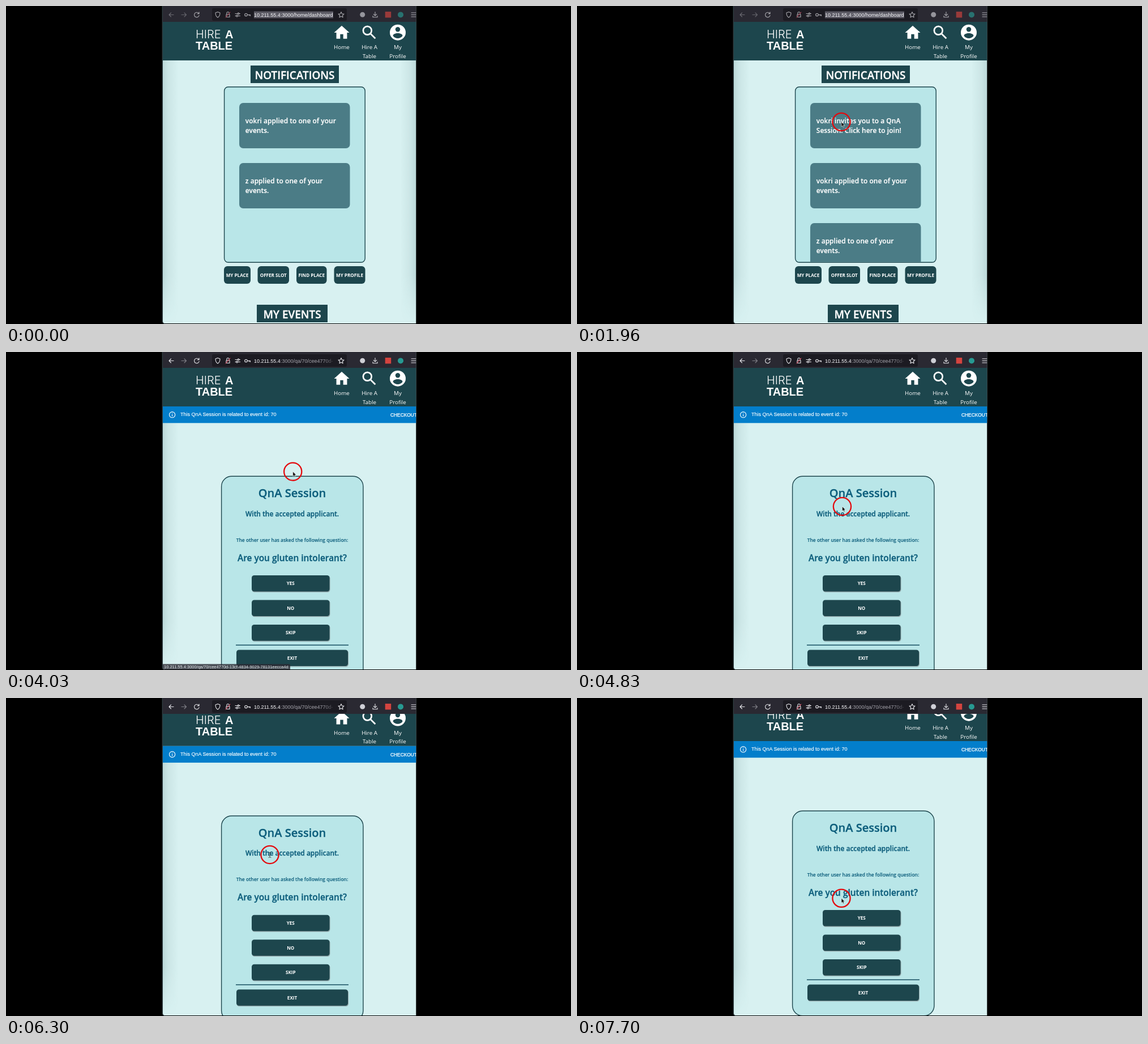
Write an HTML page that moves like this. It is 998x561 px and loops after 8000 ms.

```html
<!DOCTYPE html>
<html lang="en">
<head>
<meta charset="utf-8">
<title>Event dashboard</title>
<style>
  html, body { margin: 0; width: 100%; height: 100%; overflow: hidden; background: #000; }
  svg { display: block; width: 100vw; height: 100vh; }
  text { font-family: "Open Sans", "Noto Sans", sans-serif; white-space: pre; }
  .ui, .ui text { font-family: "Liberation Sans", Arial, sans-serif; }
  .mid { text-anchor: middle; }
  .head { font-size: 18.9px; font-weight: 600; fill: #fff; stroke: #fff; stroke-width: .35; stroke-linejoin: round; }
  .note { font-size: 11.9px; font-weight: 600; letter-spacing: .06px; fill: #fff; stroke: #fff; stroke-width: .2; stroke-linejoin: round; }
  .btn { font-size: 8.1px; font-weight: 700; fill: #fff; }
  .nav { font-size: 9.8px; fill: #fff; }
  .ask { font-weight: 600; fill: #0d5e7c; stroke: #0d5e7c; stroke-width: .3; stroke-linejoin: round; }
  .dark { fill: #1d464d; }
  .line { fill: none; stroke-width: 1.1; stroke-linecap: round; stroke-linejoin: round; }
</style>
</head>
<body>
<svg viewBox="0 0 998 561" preserveAspectRatio="none">
  <defs>
    <clipPath id="window"><path d="M277 0H724.3V560H281a4 4 0 0 1-4-4Z"/></clipPath>
    <clipPath id="page"><rect x="277" y="28" width="448" height="532"/></clipPath>
    <clipPath id="panel"><rect x="386" y="143" width="248" height="308.5" rx="6"/></clipPath>
    <clipPath id="address"><rect x="436" y="4" width="142" height="22"/></clipPath>
    <linearGradient id="edge">
      <stop offset="0" stop-color="#24575c" stop-opacity=".15"/>
      <stop offset=".45" stop-color="#24575c" stop-opacity=".06"/>
      <stop offset="1" stop-color="#24575c" stop-opacity="0"/>
    </linearGradient>
    <linearGradient id="fall" x2="0" y2="1">
      <stop offset=".84" stop-color="#fff"/>
      <stop offset="1" stop-color="#000"/>
    </linearGradient>
    <mask id="soft" maskUnits="userSpaceOnUse" x="277" y="28" width="448" height="532">
      <rect x="277" y="28" width="448" height="532" fill="url(#fall)"/>
    </mask>
    <linearGradient id="fade" gradientUnits="userSpaceOnUse" x1="560" x2="579" y1="0" y2="0">
      <stop offset="0" stop-color="#a3a2aa"/>
      <stop offset="1" stop-color="#a3a2aa" stop-opacity=".15"/>
    </linearGradient>
  </defs>

  <rect width="998" height="561"/>
  <path d="M276.300 0V556a4 4 0 0 0 4 4" fill="none" stroke="#2f3d41" stroke-width="1.400"/>

  <g clip-path="url(#window)">
    <rect x="277" width="448" height="561" fill="#d8f1f1"/>
    <g clip-path="url(#page)">
      <g mask="url(#soft)"><rect x="277" y="28" width="27" height="532" fill="url(#edge)"/></g>

      <g id="scroller">
        <rect class="dark" x="277" y="28" width="448" height="68"/>
        <g fill="#fff">
          <text x="335" y="57" font-size="20" style="font-family:Inter,sans-serif;font-weight:300">HIRE</text>
          <g class="ui" font-size="20" font-weight="700">
            <text x="387" y="57">A</text>
            <text x="335" y="77">TABLE</text>
          </g>
          <path transform="translate(576.8 30.8) scale(1.35)" d="M10 20v-6h4v6h5v-8h3L12 3 2 12h3v8z"/>
          <g fill="none" stroke="#fff" stroke-width="2.7">
            <circle cx="638.3" cy="43.2" r="7.4"/>
            <path d="M643.5 48.5L652.3 57.2"/>
          </g>
          <circle cx="692" cy="46.7" r="14"/>
        </g>
        <circle class="dark" cx="692" cy="41.3" r="4.2"/>
        <path class="dark" d="M683.5 52.4c.2-6 16.8-6 17 0a10.2 10.2 0 0 1-17 0Z"/>
        <g class="nav mid">
          <text x="593" y="76.3">Home</text>
          <text x="642" y="76.3">Hire A</text><text x="642" y="91.5">Table</text>
          <text x="692" y="76.3">My</text><text x="692" y="91.5">Profile</text>
        </g>

        <g id="dashboard">
          <g mask="url(#soft)"><rect x="-724" y="96" width="27" height="464" transform="scale(-1 1)" fill="url(#edge)"/></g>
          <rect class="dark" x="432" y="105" width="156" height="31"/>
          <text class="head mid" x="510" y="128.7">NOTIFICATIONS</text>
          <rect x="385.6" y="142.7" width="248.6" height="309.5" rx="7" fill="#b9e6e8" stroke="#1d464d" stroke-width="1.4"/>
          <g clip-path="url(#panel)"><g id="cards"></g></g>
          <g id="shortcuts"></g>
          <rect class="dark" x="443" y="527" width="125" height="31"/>
          <text class="head mid" x="505.5" y="550.5">MY EVENTS</text>
        </g>

        <g id="session">
          <rect x="277" y="96" width="448" height="29.3" fill="#037ecb"/>
          <g class="ui" fill="#fff" stroke="#fff">
            <circle class="line" cx="293.6" cy="110.7" r="5.1"/>
            <path class="line" d="M293.6 110.3v2.8M293.6 108.1v.1"/>
            <text x="308" y="113.2" font-size="9" stroke-width=".15">This QnA Session is related to event id: 70</text>
            <text x="679" y="113.9" font-size="8.4" stroke-width=".25">CHECKOUT</text>
          </g>
          <rect x="380.6" y="219.2" width="250.3" height="361.5" rx="18" fill="#b9e6e8" stroke="#1d464d" stroke-width="1.4"/>
          <g class="ask mid">
            <text x="505.5" y="255.8" font-size="20">QnA Session</text>
            <text x="505.5" y="289.6" font-size="12">With the accepted applicant.</text>
            <text x="505.5" y="334.7" font-size="8.45" stroke-width=".1">The other user has asked the following question:</text>
            <text x="505.5" y="368.6" font-size="15.4">Are you gluten intolerant?</text>
          </g>
          <g id="answers"></g>
          <rect x="406" y="516.2" width="199" height="1.7" fill="#2a6070"/>
        </g>
      </g>

      <g id="status" class="ui">
        <path d="M277 550.500H500a2 2 0 0 1 2 2V561H277Z" fill="#2b2a33"/>
        <text x="279" y="558.400" font-size="7.480" fill="#f0f0f4">10.211.55.4:3000/qa/70/cee4770d-13cf-4834-9029-78131eecca4d</text>
      </g>
    </g>

    <rect x="277" width="448" height="28" fill="#2a2932"/>
    <rect x="364" y="4" width="238" height="22" rx="3" fill="#1c1b22"/>
    <g id="icons" stroke="#e6e6ea" class="line">
      <path id="back" d="M296 15.5h-8m3.5-3.5l-3.5 3.5 3.5 3.5"/>
      <path opacity=".45" d="M310 15.5h8.5m-3.5-3.5l3.5 3.5-3.5 3.5"/>
      <path d="M340.5 13.2a4.3 4.3 0 1 0 .6 3.3M341 10.8v2.9h-2.9"/>
      <path d="M374 10.5l4 1.4c0 4-1 6.6-4 8.4-3-1.8-4-4.4-4-8.4Z"/>
      <path d="M389 15h6v4.5h-6ZM390 15v-2.5a2 2 0 0 1 4 0V15"/>
      <path stroke="#e2445c" d="M388 20l8-9"/>
      <path d="M405 13.5h4m3 0h1.5M405 17.5h1.5m3 0h4"/>
      <circle cx="410.5" cy="13.5" r="1.4"/><circle cx="408" cy="17.5" r="1.4"/>
      <circle cx="424" cy="15.5" r="2.3"/><path d="M426.5 15.5h5v2m-2-2v1.5"/>
      <path d="M592 10.5l1.5 3.2 3.5.4-2.6 2.4.7 3.5-3.1-1.8-3.1 1.8.7-3.5-2.6-2.4 3.5-.4Z"/>
      <path d="M652 10.5v6.5m-2.8-2.6l2.8 2.8 2.8-2.8M648 17.5v2.3h8v-2.3"/>
      <path d="M716 12h9m-9 3.5h9m-9 3.5h9"/>
    </g>
    <g id="badges">
      <circle cx="629.7" cy="15.3" r="4.5" fill="#cfcfd6"/>
      <rect x="669.7" y="10" width="10.5" height="10.5" fill="#d5443f"/>
      <circle cx="697" cy="15.4" r="5" fill="#279a92"/>
    </g>
    <g class="ui" font-size="9" clip-path="url(#address)">
      <g id="homeUrl">
        <rect x="438" y="9.5" width="140" height="12" fill="#5c5b65"/>
        <text x="438" y="18.6" fill="#fbfbfe">10.211.55.4:3000/home/dashboard</text>
      </g>
      <text id="sessionUrl" x="438" y="18.6" fill="url(#fade)"><tspan fill="#fbfbfe">10.211.55.4</tspan>:3000/qa/70/cee4770d-13cf</text>
    </g>

    <g id="cursor">
      <circle r="15.6" fill="none" stroke="#e4090d" stroke-width="2.3"/>
      <path id="arrow" d="M0 0V8.3L1.9 6.6 3.2 9.5 4.7 8.8 3.4 6H6Z" fill="#111" stroke="#fff" stroke-width=".6"/>
      <path id="beam" class="line" d="M-2-4.5Q0-4.5 0-3Q0-4.5 2-4.5M0-3V3.5M-2 5Q0 5 0 3.5Q0 5 2 5M-1.2 1h2.4" stroke="#333" style="stroke-width:.8"/>
    </g>
  </g>
</svg>

<script>
const LOOP = 8000, INVITED = 830, OPENED = 2360, CARD_STEP = 106;
const el = id => document.getElementById(id);
const show = (id, on) => el(id).setAttribute("display", on ? "inline" : "none");
const move = (id, x, y) => el(id).setAttribute("transform", `translate(${x} ${y})`);
const dim = (id, opacity) => el(id).setAttribute("opacity", opacity);

const card = ([first, second], i) => `<g transform="translate(412 ${171 + i * CARD_STEP})">
  <rect width="195.5" height="80" rx="7" fill="#4b7c86"/>
  <text class="note" x="10.8" y="35.8">${first}</text>
  <text class="note" x="10.8" y="53.4">${second}</text></g>`;

const shortcut = ([label, x, width]) => `<rect class="dark" x="${x}" y="459" width="${width}" height="31" rx="6"/>
  <text class="btn mid" x="${x + width / 2}" y="477.5">${label}</text>`;

const answer = ([label, x, y, width]) => `<rect x="${x + .5}" y="${y + .8}" width="${width + .5}" height="29" rx="4.5" fill="#8fa3a6"/>
  <rect class="dark" x="${x}" y="${y}" width="${width}" height="28.5" rx="4.5"/>
  <text class="btn mid" x="${x + width / 2}" y="${y + 17.3}">${label}</text>`;

const fill = (id, items, draw) => { el(id).innerHTML = items.map(draw).join(""); };

fill("cards", [
  ["vokri invites you to a QnA", "Session. Click here to join!"],
  ["vokri applied to one of your", "events."],
  ["z applied to one of your", "events."]
], card);
fill("shortcuts", [
  ["MY PLACE", 385, 47], ["OFFER SLOT", 444.5, 55.5], ["FIND PLACE", 513, 53.5], ["MY PROFILE", 579.5, 55]
], shortcut);
fill("answers", [
  ["YES", 434, 394, 137.5], ["NO", 434, 437.5, 137.5], ["SKIP", 434, 481, 137.5], ["EXIT", 407, 525.5, 197]
], answer);

// Keys are [time, ...values].
const pointerKeys = [
  [1000, 742, 330], [1630, 494, 210], [1900, 494, 210], [1960, 467, 204.5], [2100, 387, 185],
  [2300, 387, 185], [2360, 506.7, 211], [4440, 506.7, 211], [4900, 466, 276.5],
  [7500, 466, 276.5], [7700, 467, 353.3]
];
const scrollKeys = [
  [5300, 0], [5430, 7.4], [5630, 10.4], [6240, 10.4], [6300, 11.2],
  [6830, 22.2], [7340, 22.2], [7360, 20]
];
const statusKeys = [[3960, 1], [4360, 0]];
const linear = p => p;
const smooth = p => p * p * (3 - 2 * p);

function sample(keys, t, ease) {
  const next = keys.findIndex(key => key[0] > t);
  if (next < 0) return keys[keys.length - 1].slice(1);
  if (next === 0) return keys[0].slice(1);
  const [t0, ...from] = keys[next - 1], [t1, ...to] = keys[next];
  const p = ease((t - t0) / (t1 - t0));
  return from.map((v, i) => v + (to[i] - v) * p);
}

function render(t) {
  const invited = t >= INVITED, opened = t >= OPENED;
  const [x, y] = sample(pointerKeys, t, smooth);
  const [scroll] = sample(scrollKeys, t, linear);
  const overText = opened && x < 472 && Math.abs(y - 285.5 + scroll) < 11;

  show("dashboard", !opened);
  show("session", opened);
  show("homeUrl", !opened);
  show("sessionUrl", opened);
  show("status", opened);
  show("cursor", t > 1000);
  show("arrow", !overText);
  show("beam", overText);

  dim("icons", opened ? 1 : .7);
  dim("back", opened ? 1 : .5);
  dim("badges", opened ? 1 : .65);
  dim("status", sample(statusKeys, t, linear)[0]);

  el("cards").firstElementChild.setAttribute("display", invited ? "inline" : "none");
  move("cards", 0, invited ? 0 : -CARD_STEP);
  move("scroller", 0, -scroll);
  move("cursor", x, y);
}

const start = performance.now();
function tick() {
  render((performance.now() - start) % LOOP);
  requestAnimationFrame(tick);
}
tick();
</script>
</body>
</html>
```
